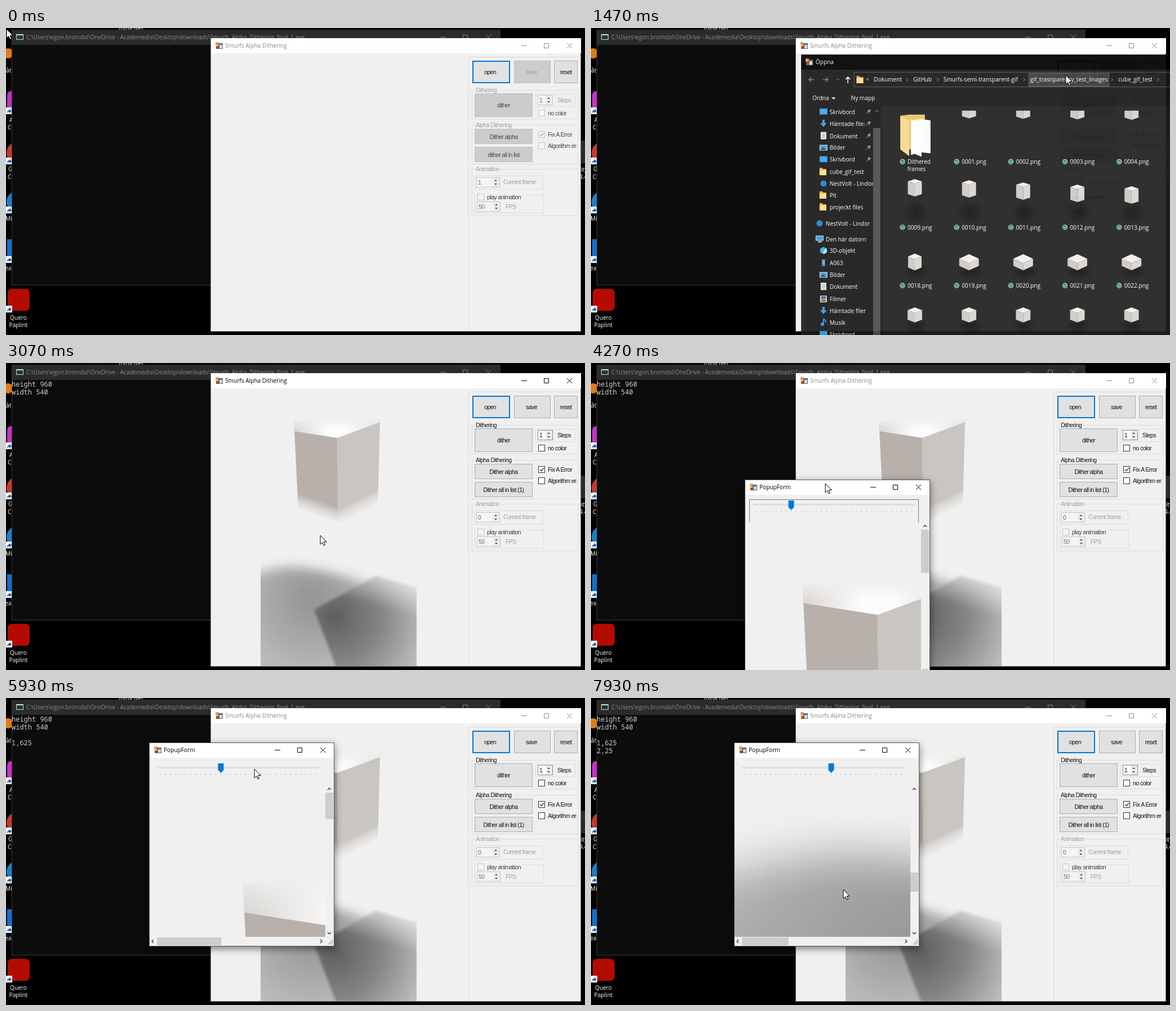
Animation of 1028x545 px, one loop 8000 ms. Source, as an HTML page:

```html
<!DOCTYPE html>
<html lang="sv">
<head>
<meta charset="utf-8">
<title>Alpha dithering demo</title>
<style>
html, body { margin: 0; width: 100%; height: 100%; overflow: hidden; background: #000; }
svg { display: block; }
text { font: 10.15px "Open Sans", sans-serif; white-space: pre; }
.ui text { font: 10.5px "Liberation Sans", Arial, sans-serif; letter-spacing: -.55px; fill: #111; }
.con text { font: 12px "Noto Sans Mono", monospace; fill: #ccc; }
.btn { fill: #e1e1e1; stroke: #adadad; }
.box { fill: #fff; stroke: #333; }
.spin { fill: #fff; stroke: #8a8a8a; }
.mid { text-anchor: middle; }
.ui .dis text { fill: #a0a0a0; }
.ui .dis .box, .dis .spin { fill: #f4f4f4; stroke: #c4c4c4; }
.ui .dis text.dark { fill: #404040; }
.ui .dis .num { fill: #6d6d6d; }
.off .live text { fill: #a0a0a0; }
.off .live text.dark { fill: #484848; }
.off .live .num { fill: #6d6d6d; }
.off .live .btn { fill: #ccc; stroke: #bfbfbf; }
.off .live .box, .off .live .spin { fill: #f4f4f4; stroke: #c4c4c4; }
.off .live .tick { stroke: #aaa; }
</style>
</head>
<body>
<svg id="stage" width="1028" height="545" viewBox="0 0 1028 545" xmlns="http://www.w3.org/2000/svg"></svg>
<script>
const rect = (x, y, w, h, fill, more = '') =>
  `<rect x="${x}" y="${y}" width="${w}" height="${h}" ${fill ? `fill="${fill}"` : ''} ${more}/>`;
const text = (x, y, s, fill, more = '') =>
  `<text x="${x}" y="${y}" ${fill ? `fill="${fill}"` : ''} ${more}>${s}</text>`;
const path = (d, fill, more = '') => `<path d="${d}" fill="${fill}" ${more}/>`;
const line = (d, stroke, more = '') => path(d, 'none', `stroke="${stroke}" ${more}`);
const disc = (x, y, r, fill) => `<circle cx="${x}" cy="${y}" r="${r}" fill="${fill}"/>`;

const defs = `<defs>
  <clipPath id="frame"><rect width="277" height="493"/></clipPath>
  <filter id="soft" x="-30%" y="-30%" width="160%" height="160%"><feGaussianBlur stdDeviation="10"/></filter>
  <filter id="edge"><feGaussianBlur stdDeviation="2.5"/></filter>
  <filter id="drop" x="-20%" y="-20%" width="140%" height="140%"><feGaussianBlur stdDeviation="7"/></filter>
  <linearGradient id="left" gradientUnits="userSpaceOnUse" x1="111" y1="202" x2="102" y2="228">
    <stop stop-color="#b8b1ab"/><stop offset="1" stop-color="#cdc8c4" stop-opacity="0"/></linearGradient>
  <linearGradient id="right" gradientUnits="userSpaceOnUse" x1="161" y1="202" x2="173" y2="226">
    <stop stop-color="#c9c5c0"/><stop offset="1" stop-color="#d8d5d2" stop-opacity="0"/></linearGradient>
  <linearGradient id="top" x1="0" x2="1" y1="0" y2="0">
    <stop stop-color="#d9d6d3"/><stop offset=".4" stop-color="#fcfcfc"/>
    <stop offset=".6" stop-color="#fcfcfc"/><stop offset="1" stop-color="#dedcda"/></linearGradient>
  <linearGradient id="fade" gradientUnits="userSpaceOnUse" x1="0" y1="52" x2="0" y2="74">
    <stop stop-color="#fff" stop-opacity="0"/><stop offset="1" stop-color="#fff"/></linearGradient>
  <mask id="haze" maskUnits="userSpaceOnUse" x="50" y="45" width="170" height="50">
    <rect x="50" y="45" width="170" height="50" fill="url(#fade)"/></mask>
  <radialGradient id="pool" gradientUnits="userSpaceOnUse" cx="90" cy="375" r="155">
    <stop stop-opacity=".39"/><stop offset="1" stop-opacity=".2"/></radialGradient>
  <radialGradient id="core" gradientUnits="userSpaceOnUse" cx="130" cy="405" r="165">
    <stop stop-color="#5e5e5e"/><stop offset=".5" stop-color="#848484"/><stop offset="1" stop-color="#bcbcbc"/></radialGradient>
  <linearGradient id="sheen" gradientUnits="userSpaceOnUse" x1="240" y1="343" x2="225" y2="393">
    <stop stop-color="#fff" stop-opacity=".55"/><stop offset="1" stop-color="#fff" stop-opacity="0"/></linearGradient>
  <radialGradient id="smudge"><stop stop-opacity=".5"/><stop offset="1" stop-opacity="0"/></radialGradient>
  <g id="render" clip-path="url(#frame)">
    <path d="M-60 350Q0 320 50 317Q120 319 200 352V570H-60Z" fill="url(#pool)" filter="url(#soft)"/>
    <g filter="url(#edge)">
      <path d="M205 333L95 393L140 510H310V364Z" fill="url(#core)"/>
      <path d="M205 333L95 393L140 510H310V364Z" fill="url(#sheen)"/>
    </g>
    <path d="M59 58L133 50L213 56L212 61L136 89L60 77Z" fill="url(#top)" mask="url(#haze)"/>
    <path d="M60 76L136 88L138 241L67 216Z" fill="url(#left)"/>
    <path d="M136 88L212 60L208 208L138 241Z" fill="url(#right)"/>
  </g>
</defs>`;

const appIcon = (x, y) => `<g transform="translate(${x} ${y})">${
  rect(0, 0, 6, 6, '#e8a33d') + rect(5, 2, 8, 10, '#3a6ec0') + rect(1, 7, 5, 5, '#c0392b') + rect(7, 5, 5, 6, '#f3dc90')}</g>`;
const winButtons = (x, y, col) => `<g stroke="${col}" fill="none">
  <path d="M${x} ${y + .5}h10M${x + 40.5} ${y - 3.5}h8v8h-8zM${x + 81} ${y - 4}l9 9m0-9l-9 9"/></g>`;

// ---- desktop and console ----
const badge = y => rect(0, y, 11, 12, '#fff') + path(`M2 ${y + 10}q0-5 4-5v-2.5l4 4l-4 4v-2.5q-3 0-4 2z`, '#1a5fb0');
const desktop = rect(0, 0, 1028, 545, '#000') +
  text(200, 4, 'mina filer', '#fff') + disc(4, 45, 9, '#e07b12') + text(0, 79, 'ått', '#fff') +
  rect(2, 112, 39, 40, '#c431c9', 'rx="7"') + badge(141) + text(6, 167, 'A', '#fff') + text(3, 180, 'C', '#fff') +
  disc(21, 222, 20, '#c33a30') + badge(230) + text(4, 254, 'G', '#fff') + text(3, 268, 'C', '#fff') +
  disc(21, 309, 20, '#1a7fc8') + badge(317) + text(-1, 342, 'Mi', '#fff') +
  rect(2, 375, 39, 39, '#0e6fd0') + badge(405) + text(-2, 430, 'ear', '#fff') +
  rect(3, 463, 39, 39, '#b30b00', 'rx="7"') + badge(493) +
  text(22, 518, 'Quero', '#fff', 'class="mid"') + text(22, 531, 'Paplint', '#fff', 'class="mid"') +
  rect(1010, 200, 30, 40, '#2a2a2a') + text(1021, 255, 'ity', '#fff') + text(1018, 268, '4.4', '#fff');

const exePath = String.raw`C:\Users\egon.bromdal\OneDrive - Academedia\Desktop\downloads\Smurfs_Alpha_Dithering_final_1.exe`;
const term = rect(10.5, 3.5, 867, 453, '#0c0c0c', 'stroke="#3a3a3a"') + rect(11, 3, 867, 27, '#2b2b2b') +
  rect(18, 11, 13, 10, '#d8d8d8') + rect(19, 13, 11, 7, '#1c3b34') + text(36, 20, exePath, '#8c8c8c') +
  winButtons(771, 16, '#858585') +
  `<g class="con">${['height 960', 'width 540', '', '1,625', '2,25'].map((s, i) =>
    text(10, 42 + i * 14, s, '', `id="out${i}"`)).join('')}</g>`;

// ---- main window ----
const button = (x, y, w, h, s, id) =>
  rect(x + .5, y + .5, w - 1, h - 1, '', 'class="btn"') +
  text(x + w / 2, y + h / 2 + 4, s, '', `class="mid dark" ${id ? `id="${id}"` : ''}`);
const outline = (x, y, w, h) => rect(x + .5, y + .5, w, h, 'none', 'stroke="#dcdcdc"');
const group = (y, h, s, w) => outline(827, y, 188, h) + rect(832, y - 2, w + 4, 5, '#f0f0f0') + text(834, y + 4, s);
const check = (x, y, s, on) => rect(x + .5, y + .5, 11, 11, '', 'class="box"') +
  (on ? line(`M${x + 3} ${y + 6}l2.5 2.5l4.5-5`, '#333', 'stroke-width="1.3" class="tick"') : '') +
  text(x + 17, y + 10, s, '', 'class="dark"');
const spin = (x, y, w, v, id) => {
  const a = x + w - 8;
  return rect(x + .5, y + .5, w - 1, 17, '', 'class="spin"') + text(x + 3, y + 12.5, v, '', `class="num" id="${id}"`) +
    rect(a - 5, y + 1, 12, 16, '#ececec') +
    path(`M${a - 2} ${y + 7}h5l-2.5-3zM${a - 2} ${y + 11}h5l-2.5 3z`, '#555');
};
const main = rect(363.5, 18.5, 657, 520, '#f0f0f0', 'stroke="#777"') + rect(364, 18, 657, 27, '#fff') +
  appIcon(372, 25) + text(389, 35, 'Smurfs Alpha Dithering', '', 'id="mainTitle"') +
  `<g id="bar0">${winButtons(915, 31, '#8a8a8a')}</g><g id="bar1">${winButtons(915, 31, '#000')}</g>
  <use id="picture" href="#render" x="452" y="45"/>` +
  line('M1021 51.5H821.5V537', '#dcdcdc') +
  `<g class="ui" id="panel">` +
  rect(829, 59, 65, 38, '#e1e1e1', 'id="open" stroke="#0078d7" stroke-width="2"') +
  text(859.5, 82, 'open', '', 'class="mid"') + button(973, 58, 42, 40, 'reset') +
  `<g class="live">` + rect(902.5, 58.5, 64, 39, '', 'class="btn"') + text(933, 82, 'save', '', 'class="mid"') +
  group(110, 51, 'Dithering', 38) + button(832, 116, 103, 42, 'dither') +
  outline(940, 117, 70, 22) + spin(944, 119, 27, 1, 'steps') + text(979, 132, 'Steps') + check(945, 145, 'no color') +
  group(172, 69, 'Alpha Dithering', 64) + button(832, 179, 103, 27, 'Dither alpha') +
  button(832, 211, 103, 27, 'dither all in list', 'all') + check(945, 183, 'Fix A Error', true) +
  `<svg width="1013" height="300">${check(945, 203, 'Algorithm error')}</svg></g><g class="dis">` +
  group(250, 83, 'Animation', 41) + outline(832, 262, 121, 24) + spin(835, 265, 42, 1, 'current') +
  text(883, 277, 'Current frame') + outline(832, 296, 122, 32) + rect(836, 293, 79, 8, '#f0f0f0') +
  check(837, 294, 'play animation') + spin(836, 308, 42, 50, 'fps') + text(887, 321, 'FPS') + `</g></g>`;

// ---- file dialog ----
const folder = (x, y) => path(`M${x} ${y}h5l1 2h6v11h-12z`, '#e8b849') + rect(x, y + 4, 12, 9, '#ffdf8a');
const icons = {
  desk: (x, y) => rect(x, y + 1, 14, 11, '#1e88d8') + rect(x + 1, y + 2, 12, 9, '#3aa9f0'),
  down: (x, y) => path(`M${x + 5} ${y}h4v6h4l-6 7l-6-7h4z`, '#3a9bea'),
  doc: (x, y) => rect(x + 2, y, 10, 13, '#f2f2f2') + line(`M${x + 4} ${y + 3.5}h6m-6 3h6m-6 3h6`, '#4a7fae'),
  pic: (x, y) => rect(x, y + 2, 14, 10, '#eee') + rect(x + 1, y + 3, 12, 8, '#3c9bdc') + path(`M${x + 1} ${y + 11}l5-5l6 5z`, '#274f74'),
  folder,
  cloud: (x, y) => disc(x + 7, y + 7, 5.5, '#1b86d6'),
  pc: (x, y) => rect(x, y + 1, 14, 9, '#dfe9f2') + rect(x + 1, y + 2, 12, 7, '#2f9ae0') + rect(x + 4, y + 11, 7, 2, '#cfd8e0'),
  box: (x, y) => path(`M${x + 7} ${y}l6 3v7l-6 3l-6-3v-7z`, '#35b1e0') + path(`M${x + 7} ${y + 6}l6-3v7l-6 3z`, '#b5e4f5'),
  phone: (x, y) => rect(x + 4, y, 6, 13, '#3b6f9c') + rect(x + 5, y + 2, 4, 8, '#5ab0ee'),
  film: (x, y) => rect(x + 1, y + 1, 12, 12, '#d8d8d8') + rect(x + 3, y + 2, 8, 5, '#3267a8') + rect(x + 3, y + 8, 8, 4, '#a5623a'),
  music: (x, y) => disc(x + 5, y + 10, 3, '#2f97ea') + line(`M${x + 7} ${y + 10}v-9q5 2 4 6`, '#2f97ea', 'stroke-width="2"'),
};
const places = [
  ['desk', 148, 'Skrivbord'], ['down', 169, 'Hämtade filer'], ['doc', 191, 'Dokument'], ['pic', 212, 'Bilder'],
  ['desk', 233, 'Skrivbord'], ['folder', 255, 'cube_gif_test'], ['cloud', 276, 'NestVolt - Lindor'], ['folder', 297, 'Pit'],
  ['folder', 318, 'projeckt files'], ['cloud', 347, 'NestVolt - Lindor', -7], ['pc', 375, 'Den här datorn', -7],
  ['box', 396, '3D-objekt'], ['phone', 418, 'A063'], ['pic', 439, 'Bilder'], ['doc', 460, 'Dokument'],
  ['film', 482, 'Filmer'], ['down', 503, 'Hämtade filer'], ['music', 524, 'Musik'], ['desk', 545, 'Skrivbord']];
const sidebar = places.map(([icon, y, s, dx = 0], i) =>
  icons[icon](403 + dx, y - 7) + text(421 + dx, y + 4, s, '#fff') +
  (i < 5 ? rect(483, y - 8, 15, 16, '#191919') + line(`M486 ${y + 4}l3.5-3.5`, '#999') +
    path(`M488 ${y - 2}l2-.5l2-2l2.5 2.5l-2 2l-.5 2.5z`, '#999') : '')).join('');

const crumbs = [[500, 'Dokument', 559], [570, 'GitHub', 614], [624, 'Smurfs-semi-transparent-gif', 768],
  [779, 'gif_trasnparency_test_images', 925], [936, 'cube_gif_test', 1007]].map(([x, s, c]) =>
  text(x, 94, s, '#fff') + line(`M${c - 1} 88l2.5 2.5l-2.5 2.5`, '#aaa')).join('');

const pitch = 96.7;
const mini = (x, y, w, d, h) =>
  path(`M${x - w} ${y + d}L${x} ${y}L${x + w} ${y + d}L${x} ${y + 2 * d}Z`, '#f3f1ef') +
  path(`M${x - w} ${y + d}l${w} ${d}v${h}l${-w} ${-d}z`, '#cfcac5') +
  path(`M${x + w} ${y + d}l${-w} ${d}v${h}l${w} ${-d}z`, '#dad6d2');
const label = (x, y, s) => disc(x, y, 4.6, '#e9f3ea') + disc(x, y, 3.7, '#2c8a43') +
  line(`M${x - 2} ${y}l1.5 1.6l2.6-3`, '#fff') + text(x + 9, y + 4, s, '#fff');
const png = n => String(n).padStart(4, '0') + '.png';
const smudge = (x, y, rx, ry) => `<ellipse cx="${x}" cy="${y}" rx="${rx}" ry="${ry}" fill="url(#smudge)"/>`;
let files = '';
for (let c = 0; c < 5; c++) {
  const x = 573 + c * pitch, lx = 551 + c * pitch;
  if (c) files += mini(x, 127 + c * .8, 12.5, 4, 24) + label(lx, 237, png(c));
  files += smudge(x + 2, 328, 24, 22) + mini(x, [268, 270, 274, 278, 281][c], 12.5, 4, 23) + label(lx, 354, png(9 + c));
  files += smudge(x + 3, 433, 26, 15) + (c ? mini(x, 402, 17.5, 8, 13) : mini(x, 401, 12, 5, 20)) + label(lx, 458, png(18 + c));
  files += smudge(x + 2, 530, 24, 15) + mini(x, 497, 13, 5, 17);
}
files += path('M547 155l16-2h28v62h-30z', '#e9c66b') + path('M566 163l20-2v58l-20 6z', '#f2f2f2') +
  path('M582 161l19 2v59l-19-2z', '#fbfbfb') + path('M566 163l19 4v61l-19-8z', '#fff') +
  path('M547 155l16 9v63l-16-12z', '#f8dc8c') + label(551, 237, 'Dithered') + text(576, 254, 'frames', '#fff', 'class="mid"');

const dialog = rect(370, 46, 1140, 508, '#202020') + rect(370, 46, 1140, 27, '#000') + rect(374, 73, 1136, 65, '#191919') +
  appIcon(378, 53) + text(396, 63, 'Öppna', '#fff') +
  line('M393 90.5h-9m4-4l-4 4l4 4M409 90.5h9m-4-4l4 4l-4 4', '#8d8d8d', 'stroke-width="1.3"') +
  line('M433 89l2.5 2.5l2.5-2.5', '#8d8d8d') + line('M453.500 97v-11m-4 4l4-4l4 4', '#fff', 'stroke-width="1.5"') +
  rect(464.5, 77.5, 1000, 26, '#191919', 'stroke="#555"') + rect(776.5, 79.5, 143, 23, '#3a3a3a', 'id="crumb" stroke="#666"') +
  folder(469, 84) + text(486, 93, '«', '#bbb') + crumbs +
  text(390, 127, 'Ordna', '#fff') + path('M424 122h8l-4 4z', '#ddd') + text(459, 127, 'Ny mapp', '#fff') +
  rect(374, 138, 140, 416, '#191919') +
  `<svg x="374" y="138" width="124" height="416" viewBox="374 138 124 416">${sidebar}</svg>` +
  rect(498, 138, 13, 416, '#171717') + rect(498.5, 177, 13, 377, '#4d4d4d') + line('M502 148l3-3l3 3', '#aaa') +
  `<svg x="514" y="146" width="996" height="408" viewBox="514 146 996 408">${rect(0, 0, 92, 103, '', 'id="cell"')}${files}</svg>`;

// ---- popup ----
let ticks = '';
for (let i = 0; i < 32; i++) ticks += `M${(20.5 + i * 8.9).toFixed(1)} 55v3`;
const popup = rect(0, 4, 329, 362, '#000', 'opacity=".5" filter="url(#drop)"') +
  rect(.5, .5, 328, 361, '#f0f0f0', 'stroke="#5a5a5a"') + rect(1, 1, 327, 26, '#fff') +
  appIcon(9, 7) + text(26, 17, 'PopupForm', '#000') + winButtons(223, 13, '#000') +
  rect(15.5, 43.5, 286, 2, '#e7eaea', 'stroke="#d6d6d6"') + line(ticks, '#c4c4c4') +
  path('M-5 37h10v12l-5 5l-5-5z', '#0078d7', 'id="knob"') +
  line('M8.500 75V35.500H308.500V75', '#000', 'id="focus" stroke-dasharray="1 1"') +
  `<svg x="1" y="76" width="312" height="269"><use id="zoomed" href="#render"/></svg>` +
  rect(313, 76, 15, 270, '#f0f0f0') + rect(313, 89, 14, 1, '#cdcdcd', 'id="vbar"') + rect(14, 346, 1, 14, '#cdcdcd', 'id="hbar"') +
  line('M317 84l3-3l3 3M317 337l3 3l3-3M8 350l-3 3l3 3M304 350l3 3l-3 3', '#444', 'stroke-width="1.5"') +
  line('M324 357.500h2m-5 0h2m-5 0h2m1-3h2m1 0h2m-2-3h2', '#aaa', 'stroke-width="2"');

const pointer = path('M0 0V16L3.700 12.500L6.200 18L8.600 17L6.200 11.600H11.300Z', '#fff', 'stroke="#000"');

document.getElementById('stage').innerHTML = defs + desktop + term + main +
  `<g id="dialog">${dialog}</g><g id="popup">${popup}</g><g id="pointer">${pointer}</g>`;

// ---- timeline ----
const mouse = [[70, 1, 2], [130, 260, 75], [200, 554, 165], [400, 554, 165], [1130, 843, 84], [1530, 843, 84],
  [2130, 664, 307], [2800, 664, 307], [3070, 558, 306], [3270, 558, 306], [3670, 431, 227], [3870, 409, 197],
  [4200, 409, 197], [4270, 416, 214], [4400, 417, 218], [4530, 417, 218], [4930, 398, 90], [5060, 398, 90],
  [5470, 438, 127], [5860, 438, 127], [5930, 441, 126], [6330, 441, 126], [6730, 428, 337], [6870, 448, 340]];
const popupAt = [[4530, 273, 207], [4930, 254, 79]];
const wheel = [[7000, 0], [7670, 900], [7800, 900], [7930, 1128]];
const dialogIn = [[1330, .35, .98], [1400, .7, .989], [1470, .92, .9947], [1530, 1, 1], [2400, 1, 1], [2470, .5, .99]];
const popupIn = [[3270, .4, .97], [3330, .8, .99], [3400, 1, 1]];

const linear = p => p, smooth = p => p * p * (3 - 2 * p);
function at(keys, t, ease = linear) {
  const i = keys.findIndex(k => k[0] > t);
  if (i < 0) return keys[keys.length - 1].slice(1);
  if (!i) return keys[0].slice(1);
  const a = keys[i - 1], b = keys[i], p = ease((t - a[0]) / (b[0] - a[0]));
  return a.slice(1).map((v, j) => v + (b[j + 1] - v) * p);
}

const el = {};
document.querySelectorAll('#stage [id]').forEach(n => el[n.id] = n);
const set = (id, o) => { for (const k in o) el[id].setAttribute(k, o[k]); };
const show = (id, on) => { el[id].style.display = on ? '' : 'none'; };
const scaleAt = (x, y, s) => `translate(${x} ${y}) scale(${s}) translate(${-x} ${-y})`;

function render(t) {
  const [mx, my] = at(mouse, t, smooth);
  set('pointer', { transform: `translate(${mx} ${my})` });

  [2530, 2530, 0, 5530, 6130].forEach((from, i) => show('out' + i, t >= from));

  const loaded = t >= 2600, active = t >= 1130 && t < 1330 || t >= 2530 && t < 3270;
  set('mainTitle', { fill: active ? '#000' : '#8a8a8a' });
  show('bar0', !active);
  show('bar1', active);
  show('picture', loaded);
  el.panel.classList.toggle('off', !loaded);
  el.all.textContent = loaded ? 'Dither all in list (1)' : 'dither all in list';
  el.current.textContent = loaded ? 0 : 1;
  const overOpen = t < 1330 && mx > 828 && mx < 895 && my > 58 && my < 98;
  set('open', { fill: overOpen ? '#e5f1fb' : '#e1e1e1' });

  const open = t >= 1330 && t < 2530;
  show('dialog', open);
  if (open) {
    const [alpha, s] = at(dialogIn, t);
    set('dialog', { opacity: alpha, transform: scaleAt(940, 300, s) });
    show('crumb', mx > 777 && mx < 920 && my > 79 && my < 103);
    const col = Math.floor((mx - 529.3) / pitch), low = my > 260;
    show('cell', my > 146);
    set('cell', { x: 529.3 + col * pitch, y: low ? 260 : 143, fill: t >= 2330 ? '#777' : t >= 2270 ? '#626262' : '#4d4d4d' });
  }

  show('popup', t >= 3270);
  if (t >= 3270) {
    const [px, py] = at(popupAt, t, smooth), [alpha, s] = at(popupIn, t);
    set('popup', { opacity: alpha, transform: `translate(${px} ${py}) ` + scaleAt(164, 181, s) });
    const zoom = t < 5530 ? 1 : t < 6130 ? 1.625 : 2.25, [top] = at(wheel, t);
    const w = 480 * zoom, h = 855 * zoom;
    set('zoomed', { transform: `translate(-1 ${11.5 - top}) scale(${1.734 * zoom})` });
    set('knob', { transform: `translate(${82.5 + (zoom - 1) * 72} 0)` });
    set('vbar', { y: 89 + 242 * top / h, height: 242 * 270 / h });
    set('hbar', { width: 286 * 312 / w });
    show('focus', t < 5530);
  }
}

const start = performance.now();
function tick() {
  const t = (performance.now() - start) % 8000;
  render(Math.round(Math.floor((t + 4) * .015) * 20 / 3) * 10);
  requestAnimationFrame(tick);
}
tick();
</script>
</body>
</html>
```
